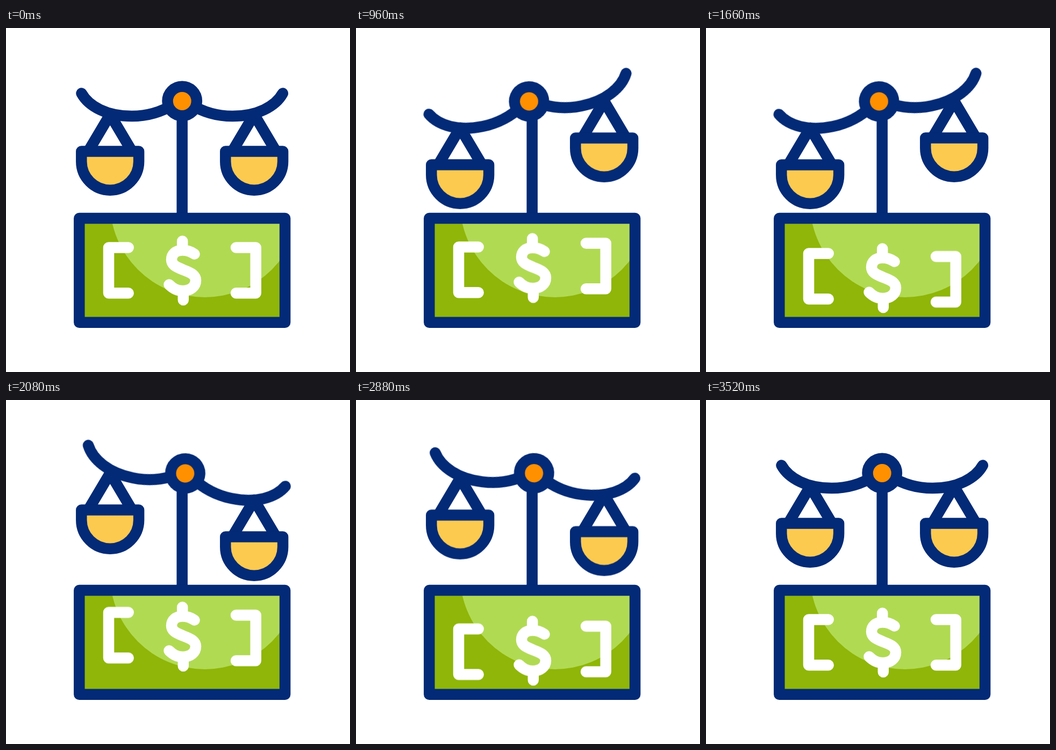
Write an HTML page that moves like this. It is 640 px wide and 640 px high and loops after 3620 ms.

```html
<!DOCTYPE html>
<html lang="en">
<head>
<meta charset="utf-8">
<title>Scales and banknote</title>
<style>
  html, body { margin: 0; width: 100%; height: 100%; overflow: hidden; background: #fff; }
  svg { display: block; width: 100vw; height: 100vh; }
  .line { fill: none; stroke: #032a76; stroke-width: 20.5; stroke-linecap: round; stroke-linejoin: round; }
  .mark { fill: none; stroke: #fff; stroke-width: 20.5; stroke-linecap: round; stroke-linejoin: round; }
  #beam { transform-origin: 327.7px 164px; }
</style>
</head>
<body>
<svg viewBox="0 0 640 640">
  <defs>
    <clipPath id="note"><rect x="136.3" y="354" width="382.8" height="193.7"/></clipPath>
    <g id="pan">
      <path class="line" d="M153 229.5L193.7 161L234.4 229.5"/>
      <path class="line" style="fill:#fdca50" d="M140.3 229.5H247.1V248.3a53.4 53.4 0 0 1-106.8 0Z"/>
    </g>
    <path id="arm" class="line" d="M140.5 121.5C154 146 188 164 234 164C262 164 288 157 312 142"/>
  </defs>

  <path class="line" d="M327.7 150V354"/>
  <g id="left"><use href="#pan"/></g>
  <g id="right"><use href="#pan" x="268"/></g>
  <g id="beam">
    <use href="#arm"/>
    <use href="#arm" transform="translate(655.4 0) scale(-1 1)"/>
    <circle class="line" style="fill:#ff9000" cx="327.7" cy="136" r="27.2"/>
  </g>

  <g clip-path="url(#note)">
    <rect x="136" y="354" width="384" height="194" fill="#8fb608"/>
    <circle cx="370" cy="324.5" r="176.5" fill="#b1da53"/>
  </g>
  <rect class="line" x="136.3" y="354" width="382.8" height="193.7"/>

  <path id="open" class="mark" d="M227.7 408.5H191V493.3H227.7"/>
  <path id="dollar" class="mark" d="M328.2 396.5V412M329.8 490V506
    M350.5 420.5C342 414.5 335 413.5 328 413.5C316 413.5 308 421 308 431C308 440 315 444 330 450
    C345 455.5 353 460 353 469.5C353 481 343 489 329 489C318 489 311 485 303.5 477.5"/>
  <path id="close" class="mark" d="M428 408.5H464.7V493.3H428"/>
</svg>
<script>
const LOOP = 3620;
const SOFT = 'cubic-bezier(.333,0,.667,1)';
const FIRM = 'cubic-bezier(.62,0,.38,1)';

// steps: [time in ms, value], eased between neighbours
function play(id, steps, ease, toCss, delay = 0) {
  const last = steps.length - 1;
  const frames = [[-delay, steps[0][1]], ...steps, [LOOP - delay, steps[last][1]]]
    .map(([t, v]) => ({ offset: (t + delay) / LOOP, transform: toCss(v), easing: ease }));
  document.getElementById(id).animate(frames, { duration: LOOP, iterations: Infinity });
}

const shiftY = k => v => `translate(0px, ${v * k}px)`;

const tilt = [[220, 0], [1095, -1], [1610, -1], [2135, 1], [2470, 1], [3365, 0]];
play('beam', tilt, FIRM, v => `rotate(${v * 12}deg)`);
play('left', tilt, FIRM, shiftY(-25.5));
play('right', tilt, FIRM, shiftY(25.5));

const bob = [[210, 0], [610, -15.5], [1406, 19.5], [2200, -15.5], [3000, 19.5], [3400, 0]];
['open', 'dollar', 'close'].forEach((id, i) => play(id, bob, SOFT, shiftY(1), i * 57));
</script>
</body>
</html>
```
